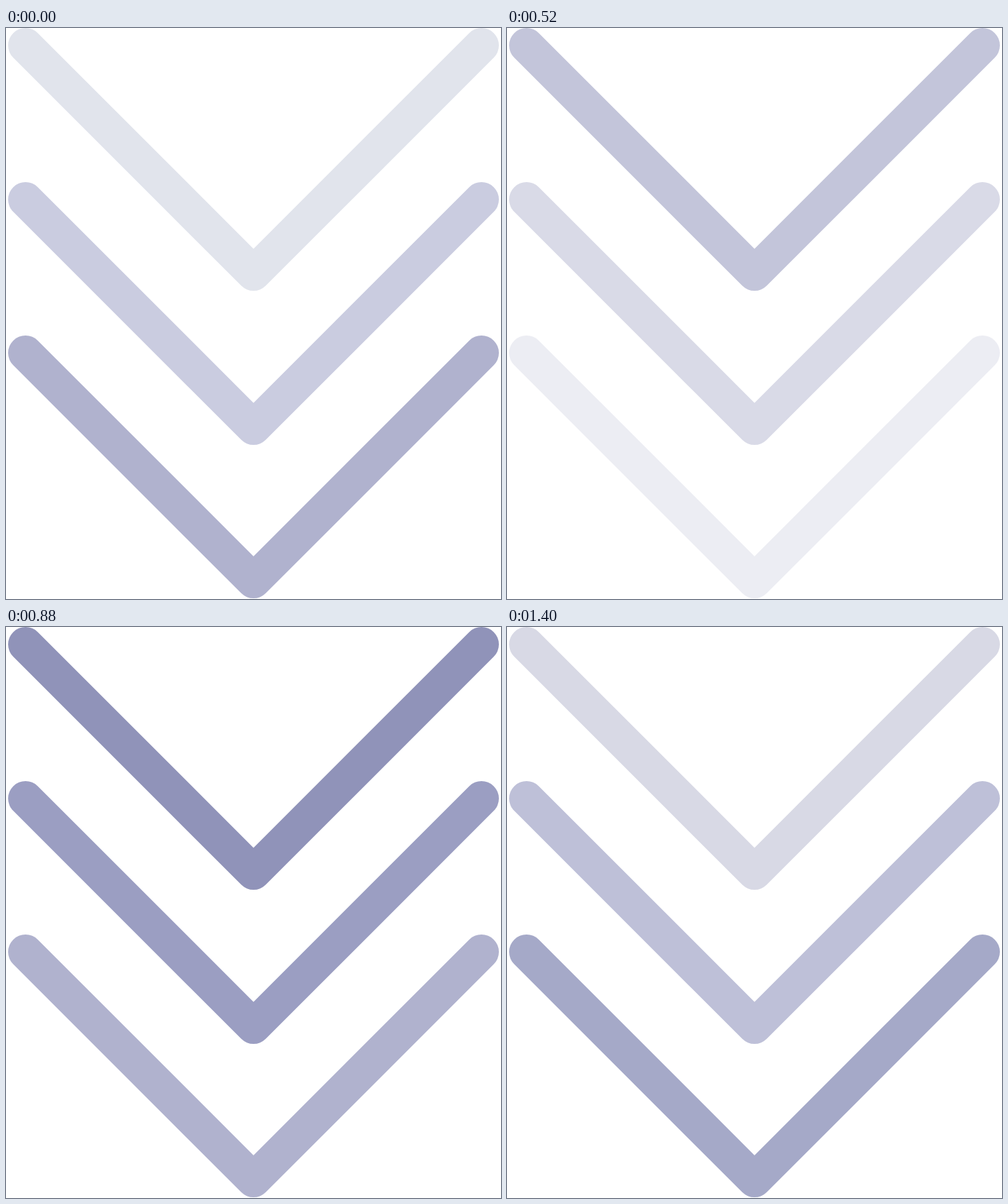
Recreate the animation shown at these times as an HTML page without scripts. Size 697 px wide and 804 px high, loop 1.52 s.

```html
<!DOCTYPE html>
<html lang="en">
<head>
<meta charset="utf-8">
<title>Scroll down chevrons</title>
<style>
  html, body { margin: 0; width: 100%; height: 100%; overflow: hidden; background: #fff; }
  svg { display: block; width: 697px; height: 804px; }
  use {
    fill: none;
    stroke-width: 49;
    stroke-linecap: round;
    stroke-linejoin: round;
    animation: 1520ms step-end infinite;
  }
  .top { animation-name: top; }
  .mid { animation-name: mid; }
  .low { animation-name: low; }

  /* One fading wave runs down the three chevrons in held steps. */
  @keyframes top {
    0% { stroke: #e1e4ec; }
    7.89% { stroke: #efeef4; }
    15.78% { stroke: #eeeef4; }
    26.31% { stroke: #d9dae7; }
    34.21% { stroke: #c3c5da; }
    42.1% { stroke: #adafcc; }
    50% { stroke: #9b9ec1; }
    57.89% { stroke: #9093b9; }
    65.78% { stroke: #9497bc; }
    76.31% { stroke: #aaaecc; }
    84.21% { stroke: #c2c4da; }
    92.1%, 100% { stroke: #d8d9e5; }
  }
  @keyframes mid {
    0% { stroke: #cacce0; }
    7.89% { stroke: #e1e1eb; }
    15.78% { stroke: #eeeef4; }
    26.31% { stroke: #ebecf1; }
    34.21% { stroke: #d9dae7; }
    42.1% { stroke: #c6c8dc; }
    50% { stroke: #aeb0cd; }
    57.89% { stroke: #9b9ec2; }
    65.78% { stroke: #9295bb; }
    76.31% { stroke: #989bc0; }
    84.21% { stroke: #aaadcb; }
    92.1%, 100% { stroke: #bec0d8; }
  }
  @keyframes low {
    0% { stroke: #b0b2ce; }
    7.89% { stroke: #c9c9df; }
    15.78% { stroke: #e0e1eb; }
    26.31% { stroke: #eeeff5; }
    34.21% { stroke: #ecedf3; }
    42.1% { stroke: #dfdfea; }
    50% { stroke: #c8c9dd; }
    57.89% { stroke: #b0b2ce; }
    65.78% { stroke: #9c9fc2; }
    76.31% { stroke: #9093b9; }
    84.21% { stroke: #9699be; }
    92.1%, 100% { stroke: #a5a9c8; }
  }
</style>
</head>
<body>
<svg viewBox="0 0 697 804">
  <defs><path id="chevron" d="M27.5 24.5l321 321 321-321"/></defs>
  <use class="top" href="#chevron"/>
  <use class="mid" href="#chevron" y="217"/>
  <use class="low" href="#chevron" y="433"/>
</svg>
</body>
</html>
```
